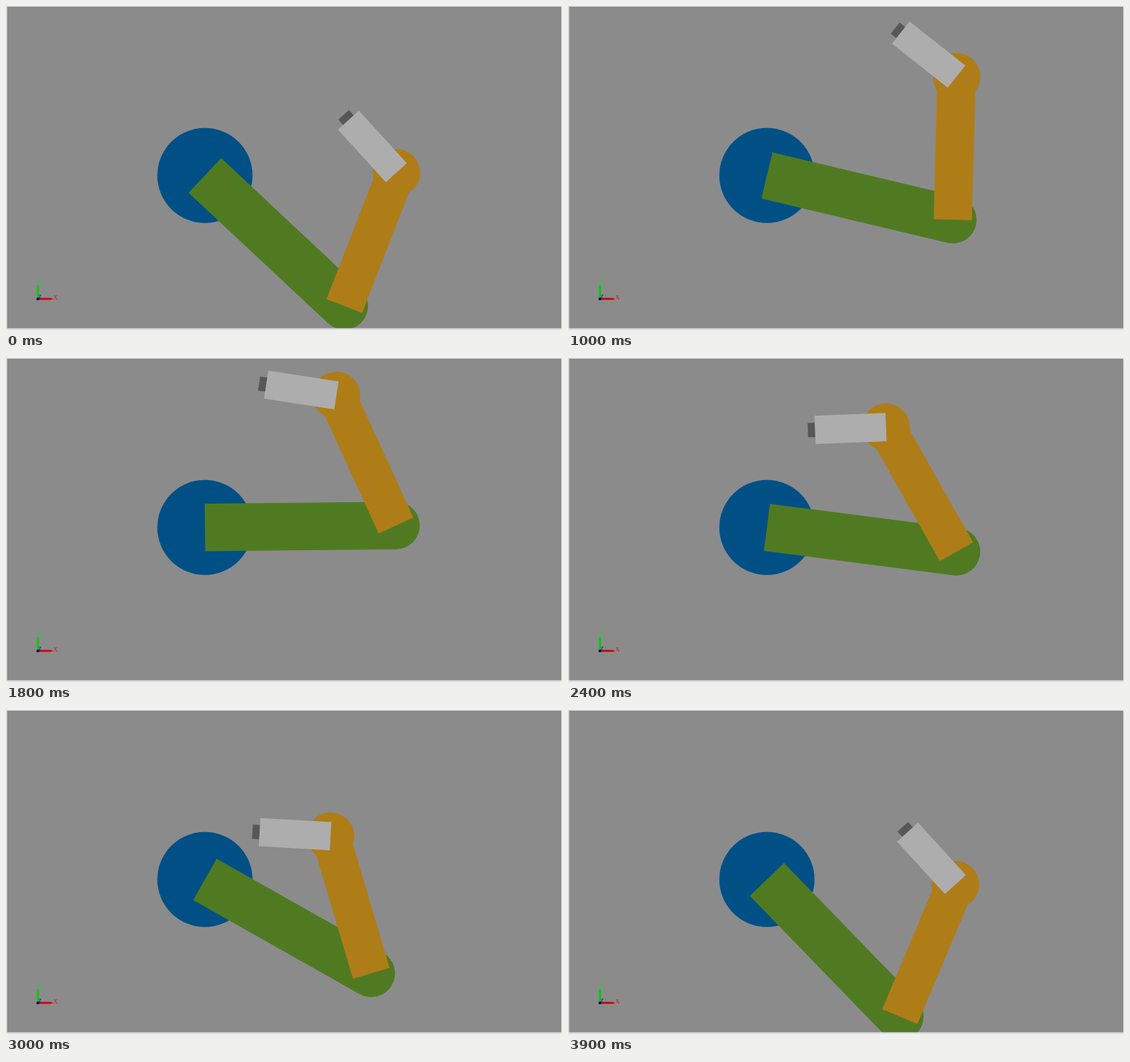
Write an HTML page that moves like this. It is 800 px wide and 467 px high and loops after 4 s.

```html
<!DOCTYPE html>
<html lang="en">
<head>
<meta charset="utf-8">
<title>Planar arm tracing a square</title>
<style>
  html, body { margin: 0; width: 100%; height: 100%; overflow: hidden; background: #8b8b8c; }
  svg { display: block; width: 800px; height: 467px; }
  text { font: 9px "Liberation Serif", serif; }
</style>
</head>
<body>
<svg viewBox="0 0 800 467">
  <rect width="800" height="467" fill="#8b8b8c"/>
  <circle cx="286.2" cy="244.2" r="68.5" fill="#005086"/>
  <g id="upper" fill="#507a22">
    <rect y="-34.2" width="275" height="68.4"/>
    <circle cx="275" r="34.2"/>
  </g>
  <g id="fore" fill="#ae7d18">
    <rect y="-27.5" width="206.3" height="55"/>
    <circle cx="206.3" r="34.2"/>
  </g>
  <g id="hand">
    <rect x="102" y="-10.3" width="10.6" height="20.6" fill="#575757"/>
    <rect y="-20.4" width="102.3" height="40.8" fill="#adadad"/>
  </g>
  <g>
    <path d="M44.5 422V403l1.5-2 1.5 2V422z" fill="#00d000"/>
    <path d="M46 420.8H64l4 1.4-4 1.4H46z" fill="#d00000"/>
    <rect x="44" y="420.5" width="3.5" height="3.5" fill="#000078"/>
    <text x="45.5" y="400" fill="#20d020">Y</text>
    <text x="68" y="423" fill="#d81818">X</text>
    <text x="46" y="422" fill="#1818a0">Z</text>
  </g>
  <g>
    <rect width="800" height="1" fill="#dedede"/>
    <rect width="1.6" height="467" fill="#dedede"/>
    <rect x="799" width="1" height="467" fill="#e6e6e6"/>
    <rect y="464.5" width="800" height="2.5" fill="#dcdce4"/>
  </g>
</svg>
<script>
const LOOP = 4000, STEP = 100, DEG = Math.PI / 180;
const BASE = { x: 286.2, y: 244.2 };
const UPPER = 275, FORE = 206.3, HAND = 102.2;
const BOX = { left: 355.5, right: 492.8, top: 38.4, bottom: 176 };

// Playback time -> distance along the square, one side per 1000
const PACE = [[0, 83], [600, 667], [1000, 1101], [1800, 1862],
              [2400, 2474], [3000, 3069], [3900, 3970]];

// Hand angle along each side: start, end, start slope, end slope
const TILT = [
  [228.9, 222, -15, 4],
  [222, 183.7, -35, -35],
  [183.7, 180, -20, 14],
  [180, 228.9, 46, 38]
];

const parts = ['upper', 'fore', 'hand'].map(id => document.getElementById(id));
const lerp = (a, b, u) => a + (b - a) * u;

function pace(t) {
  const i = PACE.findIndex((p, k) => k === PACE.length - 1 || t < PACE[k + 1][0]);
  const [t0, s0] = PACE[i], [t1, s1] = PACE[i + 1] || [LOOP, LOOP + 83];
  return lerp(s0, s1, (t - t0) / (t1 - t0));
}

function hermite([a, b, m, n], u) {
  const v = 1 - u;
  return a * (1 + 2 * u) * v * v + b * u * u * (3 - 2 * u) + m * u * v * v - n * u * u * v;
}

function corner(side, u) {
  const { left, right, top, bottom } = BOX;
  return [
    { x: right, y: lerp(bottom, top, u) },
    { x: lerp(right, left, u), y: top },
    { x: left, y: lerp(top, bottom, u) },
    { x: lerp(left, right, u), y: bottom }
  ][side];
}

const along = (p, angle, d) => ({ x: p.x + d * Math.cos(angle), y: p.y + d * Math.sin(angle) });
const heading = (p, q) => Math.atan2(q.y - p.y, q.x - p.x);

function place(el, p, angle) {
  el.setAttribute('transform', `translate(${p.x} ${p.y}) rotate(${angle / DEG})`);
}

function draw(t) {
  const s = pace(t) / 1000 % 4, side = Math.floor(s), u = s - side;
  const tilt = hermite(TILT[side], u) * DEG;
  const wrist = along(corner(side, u), tilt, -HAND);
  const reach = Math.hypot(wrist.x - BASE.x, wrist.y - BASE.y);
  const bend = Math.acos((UPPER ** 2 + reach ** 2 - FORE ** 2) / (2 * UPPER * reach));
  const lift = heading(BASE, wrist) + bend;
  const elbow = along(BASE, lift, UPPER);
  place(parts[0], BASE, lift);
  place(parts[1], elbow, heading(elbow, wrist));
  place(parts[2], wrist, tilt);
}

const start = performance.now();
function tick() {
  const t = (performance.now() - start) % LOOP;
  draw(Math.floor(t / STEP) * STEP);
  requestAnimationFrame(tick);
}
tick();
</script>
</body>
</html>
```
